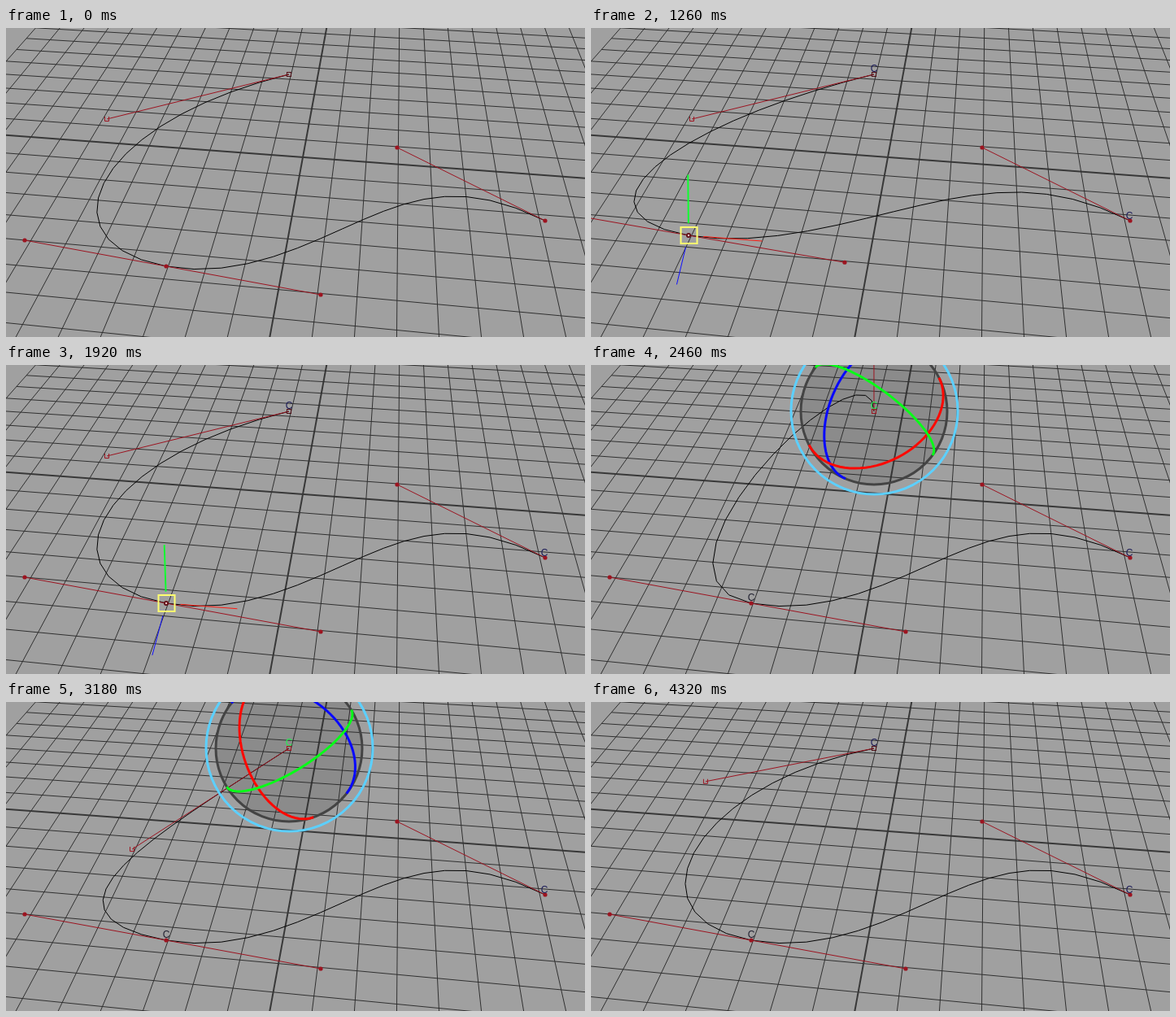
Recreate the animation shown at these times as an HTML page with a canvas. Size 712 px wide and 380 px high, loop 4680 ms.

```html
<!DOCTYPE html>
<html lang="en">
<head>
<meta charset="utf-8">
<title>Bezier curve handles</title>
<style>
html, body { margin: 0; width: 712px; height: 380px; overflow: hidden; background: #a0a0a0; }
canvas { display: block; }
</style>
</head>
<body>
<canvas id="stage" width="712" height="380"></canvas>
<script>
const ctx = document.getElementById('stage').getContext('2d');
const LOOP = 4680, STEP = 60, RED = '#9c1420';
const start = [348, 57], end = [663, 237], endHandle = [481, 147];

// Anchor drag: time, x, y
const dragKeys = [
  [600, 197, 293], [720, 250, 245], [840, 381, 139], [930, 385, 92], [1020, 290, 78],
  [1140, 165, 150], [1260, 120, 255], [1380, 155, 320], [1530, 265, 310],
  [1680, 297, 261], [1800, 245, 292], [1920, 197, 293]
];
// Handle rotation: time, green axis, red axis, handle scale
const turnKeys = [
  [2220, .05, -.87, .5, -.985, -.08, .1, 1.066],
  [2460, .57, -.76, -.3, -.32, -.62, .7, 1.06],
  [2820, .05, -.87, .5, -.985, -.08, .1, 1.066],
  [3180, -.5, -.81, .31, -.73, .26, -.62, .975],
  [3450, .03, -.87, .5, -.985, -.06, .1, 1.07],
  [3660, .13, -.906, .4, -.985, -.11, .13, 1],
  [3780, .13, -.906, .4, -.985, -.08, .13, 1]
];

// Smooth curve through keys, held still at both ends
function sample(keys, t) {
  const last = keys.length - 1;
  if (t <= keys[0][0]) return keys[0].slice(1);
  if (t >= keys[last][0]) return keys[last].slice(1);
  const i = keys.findIndex(k => k[0] > t) - 1, a = keys[i], b = keys[i + 1];
  const span = b[0] - a[0], s = (t - a[0]) / span;
  const slope = (n, c) => n === 0 || n === last ? 0 :
    (keys[n + 1][c] - keys[n - 1][c]) / (keys[n + 1][0] - keys[n - 1][0]) * span;
  return a.slice(1).map((v, j) => {
    const c = j + 1, m0 = slope(i, c), m1 = slope(i + 1, c), d = b[c] - v;
    return v + s * (m0 + s * (3 * d - 2 * m0 - m1 + s * (m0 + m1 - 2 * d)));
  });
}

function stroke(points, color, width = 1) {
  ctx.beginPath();
  points.forEach(p => ctx.lineTo(p[0], p[1]));
  ctx.strokeStyle = color;
  ctx.lineWidth = width;
  ctx.stroke();
}
function dot([x, y], radius = 2.6, color = RED) {
  ctx.beginPath();
  ctx.arc(x, y, radius, 0, 7);
  ctx.fillStyle = color;
  ctx.fill();
}
function circle([x, y], radius, color) {
  ctx.beginPath();
  ctx.arc(x, y, radius, 0, 7);
  ctx.strokeStyle = color;
  ctx.lineWidth = 3;
  ctx.stroke();
}
function label(x, y, color = '#1c1c58') {
  ctx.font = '12px "Liberation Sans", Arial, sans-serif';
  ctx.textAlign = 'center';
  ctx.fillStyle = color;
  ctx.fillText('C', x, y);
}

// Perspective ground plane
function ground(u, v) {
  const a = -.00429 * u, b = .0326 * v, w = 1 + a + b;
  return [(365 - 8630 * a + 488 * b) / w, (159 - 510 * a - 510 * b) / w];
}
function drawGrid() {
  for (let i = -12; i <= 12; i++) {
    const color = i ? '#303030' : '#383838', width = i ? 1 : 2;
    stroke([ground(i, -12), ground(i, 12)], color, width);
    stroke([ground(-12, i), ground(12, i)], color, width);
  }
}

// Rational Bezier span, weighted by depth
function drawSpan(points, weights) {
  const line = [];
  for (let i = 0; i <= 16; i++) {
    const t = i / 16, r = 1 - t;
    const f = [r * r * r, 3 * t * r * r, 3 * t * t * r, t * t * t].map((b, k) => b * weights[k]);
    const sum = f[0] + f[1] + f[2] + f[3];
    line.push([0, 1].map(c => f.reduce((n, b, k) => n + b * points[k][c], 0) / sum));
  }
  stroke(line, '#000');
}

const unit = v => v.map(c => c / Math.hypot(...v));
const cross = (a, b) => [a[1] * b[2] - a[2] * b[1], a[2] * b[0] - a[0] * b[2], a[0] * b[1] - a[1] * b[0]];

// Front half of a great circle around the given axis
function drawRing(axis, color) {
  const side = unit([-axis[1], axis[0], 0]);
  let front = cross(axis, side);
  if (front[2] < 0) front = front.map(c => -c);
  const line = [];
  for (let i = 0; i <= 40; i++) {
    const a = Math.PI * i / 40;
    line.push([0, 1].map(c => start[c] + 90 * (side[c] * Math.cos(a) + front[c] * Math.sin(a))));
  }
  stroke(line, color, 3);
}

function drawMover([x, y]) {
  const k = (y - 139) / 122;
  const arm = (dx, dy, from, color, width) =>
    stroke([[x + dx * from, y + dy * from], [x + dx, y + dy]], color, width);
  arm(100 - 10 * k, 8 - k, .2, '#ff1a10', 1);
  arm(-7 - 8 * k, 50 + 11 * k, .24, '#1010ff', 1);
  arm(4 - 5 * k, -82 + 8 * k, .2, '#10ff30', 2);
  ctx.strokeStyle = '#ffff70';
  ctx.lineWidth = 2;
  ctx.strokeRect(x - 9.5, y - 10, 20, 20);
  dot([x, y], 3, '#601018');
  dot([x, y], 1.2, '#e8c0c0');
}

function draw(t) {
  const moving = t >= 660 && t < 2280, turning = t >= 2280 && t < 3900;
  const mid = sample(dragKeys, t);
  const lift = (293 - mid[1]) / 154;
  const left = [mid[0] - 174 - 7 * lift, mid[1] - 32 + 5 * lift];
  const right = [mid[0] + 190 + 8 * lift, mid[1] + 35 - 7 * lift];

  const pose = sample(turnKeys, t);
  const green = unit(pose.slice(0, 3)), red = unit(pose.slice(3, 6)), blue = cross(red, green);
  const handle = t < 2280 ? [124, 112] :
    [0, 1].map(c => start[c] + pose[6] * (217 * red[c] - 15 * green[c] + 108 * blue[c]));

  ctx.fillStyle = '#a0a0a0';
  ctx.fillRect(0, 0, 712, 380);
  drawGrid();
  if (turning) dot(start, 90, 'rgba(40,36,36,.17)');

  drawSpan([start, handle, left, mid], [1.18, 1.076, .868, .833]);
  drawSpan([mid, right, endHandle, end], [.833, .798, 1.018, .896]);
  stroke([start, handle], RED);
  stroke([left, mid, right], RED);
  stroke([endHandle, end], RED);
  [left, mid, right, endHandle, end].forEach(p => dot(p));

  const [hx, hy] = handle;
  stroke([[hx - 2.5, hy - 3], [hx - 2.5, hy + 2.5], [hx + 2.5, hy + 2.5], [hx + 2.5, hy - 3]], RED);
  ctx.strokeStyle = turning ? RED : '#501018';
  ctx.strokeRect(345.5, 54.5, 5, 5);

  if (turning) {
    circle(start, 90, '#444');
    drawRing(blue, '#0808ff');
    drawRing(red, '#ff0800');
    drawRing(green, '#08ff18');
    circle([348.5, 56.5], 102.5, '#5cd0ff');
  }
  if (moving) drawMover(mid);
  if (t >= 180) {
    label(348, 54, t >= 2280 && t < 4320 ? '#20f050' : undefined);
    label(662, 235);
    if (!moving) label(197, 290, '#202030');
  }
}

function tick(now) {
  draw(Math.floor(now % LOOP / STEP) * STEP);
  requestAnimationFrame(tick);
}
tick(performance.now());
</script>
</body>
</html>
```
